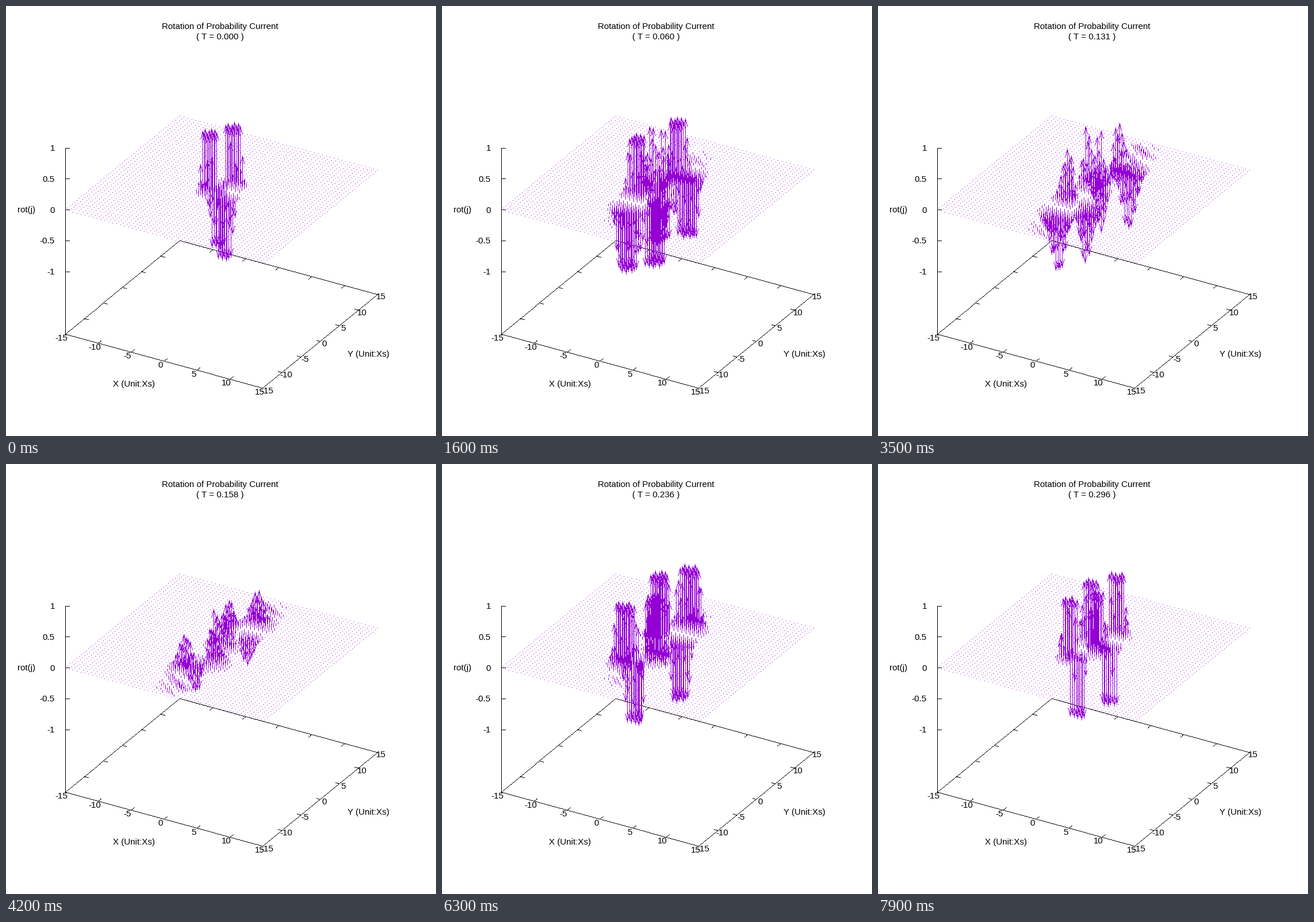
These frames come from a looping animation (748 px wide and 748 px high, 8 s). A matplotlib script:

```python
import numpy as np
import matplotlib.pyplot as plt
from matplotlib.animation import FuncAnimation
from matplotlib.collections import LineCollection

SIZE, FRAMES, DT = 748, 80, 0.00375
PERIOD = 0.296  # the packet spreads along y and comes back in this time
VIOLET = "#9400d3"
ZUNIT = 107.5
FLOOR = -216.5 / ZUNIT

plt.rcParams["font.family"] = "Liberation Sans"
plt.rcParams["font.size"] = 15.1

# Lobes of the field: x, first y, last y, swing along y, sign
LOBES = [(-1.0, -3.4, -4.3, 3.7, -1),
         (-0.8, -1.5, -2.7, 2.9, 1),
         (1.1, -1.2, -1.2, 3.2, -1)]


def project(x, y, z=0.0):
    px = 374.8 + 11.46 * x + 6.65 * y
    py = 320 + 3.13 * x - 5.43 * y - ZUNIT * z
    return px, py


def bump(x, y, cx, cy, sx, sy):
    return np.exp(-((x - cx) / sx) ** 2 / 2 - ((y - cy) / sy) ** 2 / 2)


def pair(x, y, cx, cy, s):
    """A lobe and its twin mirrored through the centre."""
    return bump(x, y, cx, cy, s, s) + bump(x, y, -cx, -cy, s, s)


def curl(x, y, t):
    part = t / PERIOD
    spread, flow = np.sin(np.pi * part), np.cos(np.pi * part)
    v = 1.6 * spread * (0.5 + flow) * pair(x, y, 1, -0.1, 0.6)
    for i, (cx, first, last, swing, sign) in enumerate(LOBES):
        cy = first + (last - first) * part - swing * spread
        grown = 1 - np.exp(-t / 0.02) if i == 0 else 1
        v += 6 * sign * flow * grown * pair(x, y, cx, cy, 0.6 + 0.4 * spread)
    v += (0.13 * spread * np.cos(2.1 * y + 1.5 * x)
          * bump(x, np.abs(y), 0, 5 + 6 * spread, 1.3, 1.9))
    return np.clip(v, -1, 1)


def snap(a):
    return np.floor(np.asarray(a)) + 0.5


def arrows(t):
    """Shaft segments and the pixels of the arrow heads."""
    v = curl(GX, GY, t)
    on = np.abs(v) * ZUNIT >= 1.5
    x, y, v = BX[on], BY[on], v[on]
    tip = snap(y - v * ZUNIT)
    shafts = np.stack([np.stack([x, y], 1), np.stack([x, tip], 1)], 1)
    head = np.clip(0.3 * np.abs(v) * ZUNIT, 2, 14)
    step = np.arange(15)
    keep = step <= head[:, None]
    wide = np.floor(step * np.tan(np.radians(15)) + 0.3)
    hy = (tip[:, None] + np.sign(v)[:, None] * step)[keep]
    left, right = ((x[:, None] + side * wide)[keep] for side in (-1, 1))
    return shafts, np.r_[left, right], np.r_[hy, hy]


fig = plt.figure(figsize=(SIZE / 72, SIZE / 72), dpi=72, facecolor="white")
ax = fig.add_axes([0, 0, 1, 1])
ax.set(xlim=(0, SIZE), ylim=(SIZE, 0))
ax.axis("off")


def pixels(x, y, color, z):
    return ax.plot(snap(x), snap(y), ",", color=color, antialiased=False,
                   zorder=z)[0]


def line(p, q):
    n = int(np.ceil(max(abs(q[0] - p[0]), abs(q[1] - p[1])))) + 1
    pixels(np.linspace(p[0], q[0], n), np.linspace(p[1], q[1], n), "black", 1)


def label(x, y, s, ha="center"):
    return ax.text(x, y + 5, s, ha=ha, va="baseline", color="black", zorder=2)


def edge_tick(x, y, dx, dy):
    a, b = project(x, y, FLOOR)
    line((a, b), (a + dx, b + dy))


# Floor frame and vertical axis
corners = [project(x, y, FLOOR) for x, y in
           [(-15, -15), (15, -15), (15, 15), (-15, 15)]]
for i in range(4):
    line(corners[i], corners[(i + 1) % 4])
line((103, 247), (103, 571))

for z in (1, .5, 0, -.5, -1):
    y = 354.5 - ZUNIT * z
    line((103, y), (110, y))
    label(85, y, f"{z:g}", "right")

for k in range(-10, 15, 5):
    edge_tick(k, -15, 5.4, -4.4)
    edge_tick(k, 15, -5.4, 4.4)
    edge_tick(15, k, -6.7, -1.8)
    edge_tick(-15, k, 6.7, 1.8)

for k in range(-15, 20, 5):
    label(269 + 11.48 * k, 624 + 3.14 * k, f"{k}")
    label(553.5 + 6.6 * k, 587 - 5.44 * k, f"{k}")

label(372.5, 35, "Rotation of Probability Current")
clock = label(372.5, 53, "( T = 0.000 )")
label(20, 354, "rot(j)", "left")
label(223, 657, "X (Unit:Xs)")
label(630.5, 605, "Y (Unit:Xs)")

# Sampling grid on the zero plane
side = np.linspace(-15, 15, 51)
GX, GY = (g.ravel() for g in np.meshgrid(side, side))
BX, BY = (snap(p) for p in project(GX, GY))
pixels(BX, BY, VIOLET, 3)

stems = LineCollection([], colors=VIOLET, linewidths=1, antialiaseds=False,
                       zorder=4)
ax.add_collection(stems, autolim=False)
heads = pixels([], [], VIOLET, 5)


def update(i):
    t = i * DT
    shafts, hx, hy = arrows(t)
    clock.set_text(f"( T = {t + 1e-9:.3f} )")
    stems.set_segments(shafts)
    heads.set_data(hx, hy)
    return stems, heads, clock


anim = FuncAnimation(fig, update, frames=FRAMES, interval=100, repeat=True,
                     repeat_delay=0, blit=False)
plt.show()
```
